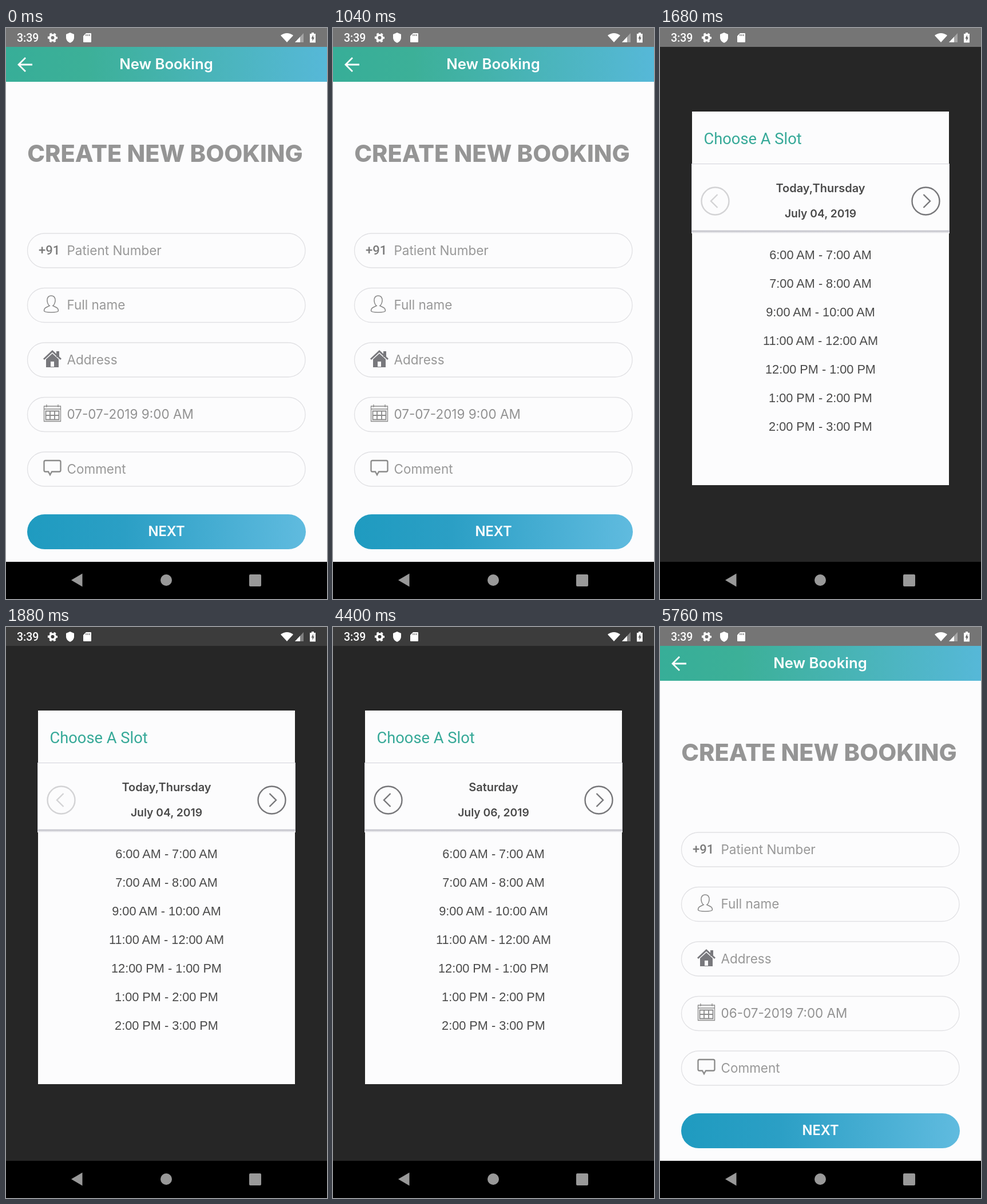
Write an HTML page that moves like this. It is 561 px wide and 998 px high and loops after 8000 ms.

```html
<!DOCTYPE html>
<html lang="en">
<head>
<meta charset="utf-8">
<title>New Booking</title>
<style>
  html, body { margin: 0; width: 100%; height: 100%; overflow: hidden; background: #000; }
  svg { display: block; width: 100%; height: 100%; }
  text { font-family: Inter, "Open Sans", sans-serif; }
  .roboto { font-family: Roboto, sans-serif; }
  .mid { text-anchor: middle; }
  .line { fill: none; stroke: #8a8a8a; }
  .field text { font-size: 22.5px; fill: #989898; }
  .day { font-weight: 600; fill: #4a4a4a; }
  .slot { font: 21.7px "Liberation Sans", Arial, sans-serif; fill: #4a4a4a; }
</style>
</head>
<body>
<svg viewBox="0 0 561 998" preserveAspectRatio="none">
  <defs>
    <linearGradient id="bar">
      <stop offset="0" stop-color="#37ae98"/>
      <stop offset=".25" stop-color="#3cb098"/>
      <stop offset="1" stop-color="#56b8d8"/>
    </linearGradient>
    <linearGradient id="cta">
      <stop offset="0" stop-color="#1f9bc0"/>
      <stop offset=".35" stop-color="#2b9fc5"/>
      <stop offset="1" stop-color="#60bbdf"/>
    </linearGradient>
    <linearGradient id="shade" x2="0" y2="1">
      <stop offset="0" stop-color="#b4b4be"/>
      <stop offset="1" stop-color="#fcfcfd"/>
    </linearGradient>
  </defs>

  <g id="form">
    <rect y="33" width="561" height="900" fill="#fcfcfd"/>
    <rect y="33" width="561" height="61" fill="url(#bar)"/>
    <path d="M46 64H22M34 52L22 64L34 76" fill="none" stroke="#fff" stroke-width="2.8"/>
    <text class="mid" x="280" y="71.500" font-size="25.700" font-weight="600" fill="#fff">New Booking</text>
    <text class="mid" x="278" y="233.500" font-size="41.500" font-weight="800" fill="#959595">CREATE NEW BOOKING</text>
    <g id="fields"></g>

    <text class="roboto" x="57" y="396" font-size="22" font-weight="500" fill="#7b7b7b">+91</text>
    <g class="line" stroke-width="1.6">
      <path d="M79 468C74 468 71.500 471.500 72 477C72.500 481 74 484 76 485.500C71 488 66.500 489 66.500 494C66.500 496 69 497 79 497S91.500 496 91.500 494C91.500 489 87 488 82 485.500C84 484 85.500 481 86 477C86.500 471.500 84 468 79 468Z"/>
    </g>
    <g fill="#78787c">
      <path d="M88 565H93V575H88Z"/>
      <path d="M81 569L70 579V593H92V579Z"/>
      <path d="M66 579L81 565L96 579" fill="none" stroke="#78787c" stroke-width="3"/>
      <path d="M78 583H84V592H78Z" fill="#fcfcfd"/>
    </g>
    <g class="line" stroke-width="1.300">
      <path d="M66.500 661H95.500V687.500H66.500ZM66.500 666H95.500M71 658V663M91 658V663"/>
      <path d="M69.500 669.500H92.500V684.500H69.500ZM69.500 677H92.500M77 669.500V684.500M85 669.500V684.500" stroke-width="1.800"/>
    </g>
    <path class="line" stroke-width="2.300" d="M69 756H93Q95.500 756 95.500 758.500V773Q95.500 775.500 93 775.500H80L77 781L74 775.500H69Q66.500 775.500 66.500 773V758.500Q66.500 756 69 756Z"/>

    <rect x="37" y="850" width="487" height="61" rx="30.500" fill="url(#cta)"/>
    <text class="mid" x="280.500" y="888" font-size="23.700" font-weight="600" fill="#fff">NEXT</text>
  </g>

  <g id="dialog">
    <rect y="33" width="561" height="900" fill="#262626"/>
    <rect x="56" y="146" width="449" height="653" fill="#fcfcfd"/>
    <text class="roboto" x="76.500" y="203" font-size="27.300" fill="#36a998">Choose A Slot</text>
    <rect x="55" y="354" width="451" height="5" fill="url(#shade)"/>
    <rect x="55.500" y="237.500" width="450" height="116.500" fill="#fcfcfd" stroke="#d3d3da"/>
    <g fill="none" stroke="#77777a" stroke-width="2.400">
      <g id="prev"><circle cx="96.500" cy="302.500" r="24"/><path d="M100.500 291L89 302.500L100.500 314"/></g>
      <g id="next"><circle cx="464.500" cy="302.500" r="24"/><path d="M460.500 291L472 302.500L460.500 314"/></g>
    </g>
    <text id="weekday" class="mid day" x="280.500" y="286.500" font-size="20"></text>
    <text id="date" class="mid day" x="280.500" y="331" font-size="19.300"></text>
    <g id="slots"></g>
  </g>

  <rect id="status" width="561" height="33"/>
  <g fill="#fff">
    <text class="roboto" x="19" y="24" font-size="19.500" font-weight="500">3:39</text>
    <circle cx="81.500" cy="17" r="4.800" fill="none" stroke="#fff" stroke-width="3.600"/>
    <circle cx="81.500" cy="17" r="7.400" fill="none" stroke="#fff" stroke-width="2.400" stroke-dasharray="3.875" stroke-dashoffset="1.900"/>
    <path d="M112 8L119 11V16.500C119 21 116 24.500 112 26C108 24.500 105 21 105 16.500V11Z"/>
    <path d="M140 9H148Q149 9 149 10V24Q149 25 148 25H136Q135 25 135 24V14Z"/>
    <path d="M140 11V14M143 11V14M146 11V14" stroke="#777" stroke-width="1.400"/>
    <path d="M480 13Q491 5 502 13L491 25Z"/>
    <path d="M520 9V25H505Z" fill-opacity=".35"/>
    <path d="M514 15.500V25H505Z"/>
    <path d="M534 8H538V10H541V25.500H531V10H534Z"/>
    <path d="M537 12L533.500 18.500H535.500V23L539 16.500H537Z" fill="#666"/>
  </g>

  <rect y="933" width="561" height="65"/>
  <g fill="#999">
    <path d="M114 965L133.500 953.500V976.500Z"/>
    <circle cx="280" cy="965" r="10"/>
    <rect x="425" y="955" width="21" height="21" rx="2"/>
  </g>
</svg>
<script>
  const LOOP = 8000;
  const OPEN = 1680, CLOSE = 5720;
  const $ = id => document.getElementById(id);

  const labels = ["Patient Number", "Full name", "Address", "", "Comment"];
  $("fields").innerHTML = labels.map((label, i) => {
    const y = 359 + i * 95.5;
    return `<g class="field">
      <rect x="37.5" y="${y}" width="485.5" height="60" rx="30" fill="none" stroke="#e1e1e4" stroke-width="1.3"/>
      <text x="106.5" y="${y + 37.5}">${label}</text></g>`;
  }).join("");
  const when = document.querySelectorAll(".field text")[3];
  when.style.fill = "#929292";

  const slots = [
    "6:00 AM - 7:00 AM", "7:00 AM - 8:00 AM", "9:00 AM - 10:00 AM", "11:00 AM - 12:00 AM",
    "12:00 PM - 1:00 PM", "1:00 PM - 2:00 PM", "2:00 PM - 3:00 PM"
  ];
  $("slots").innerHTML = slots.map((slot, i) =>
    `<text class="mid slot" x="280.5" y="${403.7 + i * 50.1}">${slot}</text>`).join("");

  const days = [
    { from: 0, name: "Today,Thursday", date: "July 04, 2019" },
    { from: 3520, name: "Tomorrow,Friday", date: "July 05, 2019" },
    { from: 4240, name: "Saturday", date: "July 06, 2019" }
  ];

  const progress = (t, start, end) => Math.min(1, Math.max(0, (t - start) / (end - start)));
  const smooth = p => p * p * (3 - 2 * p);
  const mix = (a, b, p) => a + (b - a) * p;

  function render(t) {
    const open = t >= OPEN && t < CLOSE;
    $("form").style.display = open ? "none" : "";
    $("dialog").style.display = open ? "" : "none";

    // The status bar dims a little after the dialog opens.
    const dim = t < CLOSE ? progress(t, OPEN, 1880) : 1 - progress(t, CLOSE - 40, CLOSE + 40);
    const grey = Math.round(mix(117, 60, dim));
    $("status").setAttribute("fill", `rgb(${grey},${grey},${grey})`);

    when.textContent = t < CLOSE ? "07-07-2019 9:00 AM" : "06-07-2019 7:00 AM";
    when.style.opacity = t < CLOSE ? mix(1, 0.2, smooth(progress(t, 1400, 1560))) : 1;

    const day = days.filter(d => t >= d.from).pop();
    $("weekday").textContent = day.name;
    $("date").textContent = day.date;
    $("prev").style.opacity = day === days[0] ? 0.3 : 1;
    $("next").style.opacity = t < 3520 ? 1 : mix(0.8, 1, progress(t, 4240, 4400));
  }

  const start = performance.now();
  function tick() {
    render((performance.now() - start) % LOOP);
    requestAnimationFrame(tick);
  }
  tick();
</script>
</body>
</html>
```
